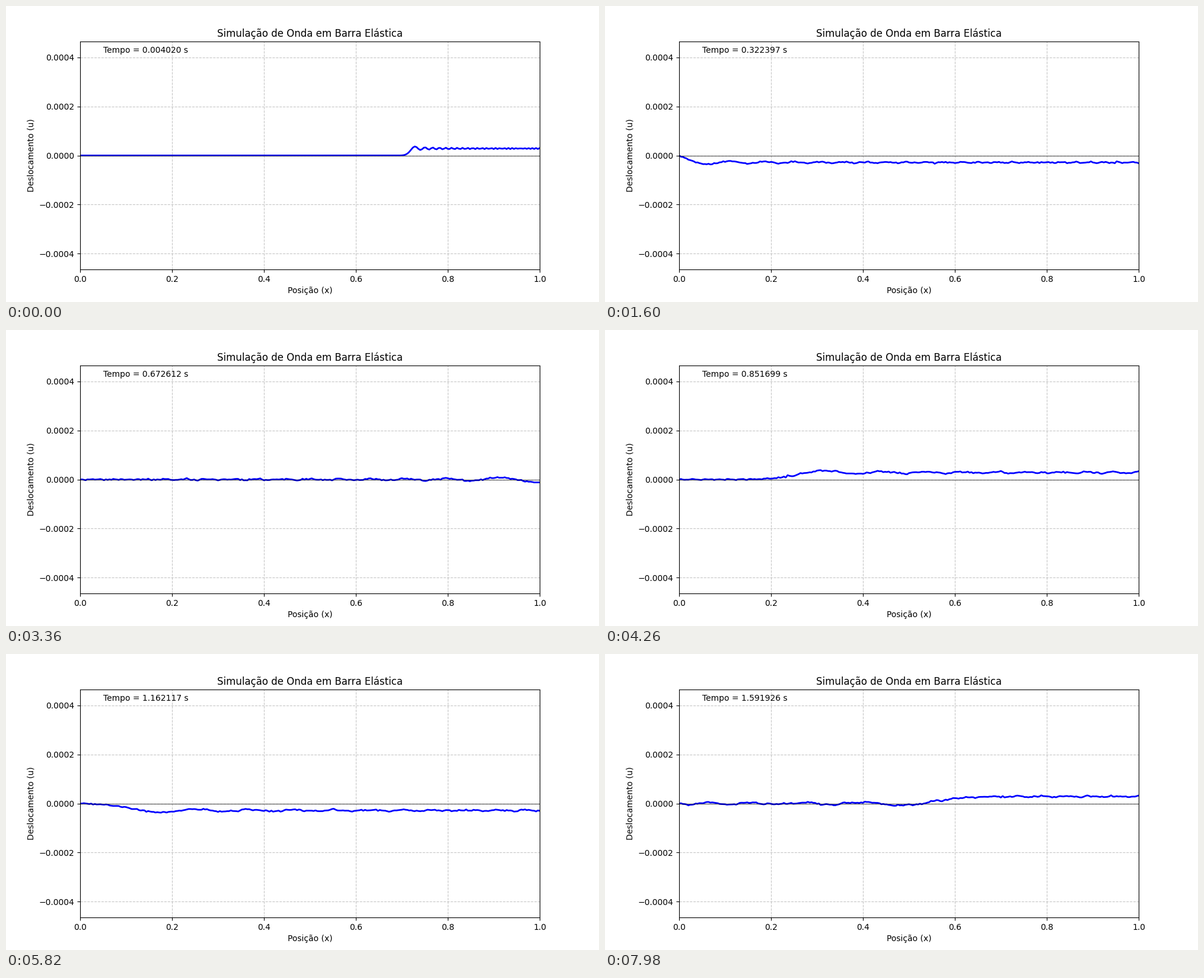
These frames come from a looping animation (1000 by 500 pixels, 8 s). A matplotlib script:

```python
import matplotlib.pyplot as plt
import numpy as np
from matplotlib.animation import FuncAnimation

FRAMES = 400
INTERVAL = 20          # ms
STEPS_PER_FRAME = 99
FIRST_STEP = 100

LENGTH = 1.0
CELLS = 250
SPEED = 71.3565        # wave speed
DT = 4.019914e-5
STEP_HEIGHT = 2.84e-5  # displacement behind the front
Y_LIMIT = 4.647e-4

x = np.linspace(0, LENGTH, CELLS + 1)
courant = SPEED * DT * CELLS / LENGTH


def simulate():
    """Leapfrog solution of a bar fixed at x=0 and struck at its free end."""
    c2 = courant ** 2
    prev = np.zeros_like(x)
    cur = np.zeros_like(x)
    cur[-1] = 2 * STEP_HEIGHT * courant
    states = []
    last_step = FIRST_STEP + STEPS_PER_FRAME * (FRAMES - 1)
    for step in range(1, last_step + 1):
        if step >= FIRST_STEP and (step - FIRST_STEP) % STEPS_PER_FRAME == 0:
            states.append(cur.copy())
        new = 2 * cur - prev
        new[1:-1] += c2 * (cur[2:] - 2 * cur[1:-1] + cur[:-2])
        new[-1] += 2 * c2 * (cur[-2] - cur[-1])
        new[0] = 0
        prev, cur = cur, new
    return states


states = simulate()

fig, ax = plt.subplots(figsize=(10, 5), dpi=100)
line, = ax.plot(x, states[0], color="blue", lw=2)
ax.axhline(0, color="black", lw=0.5)
ax.set_xlim(0, LENGTH)
ax.set_ylim(-Y_LIMIT, Y_LIMIT)
ax.set_title("Simulação de Onda em Barra Elástica")
ax.set_xlabel("Posição (x)")
ax.set_ylabel("Deslocamento (u)")
ax.grid(True, linestyle="--", alpha=0.7)
clock = ax.text(0.05, 0.95, "", transform=ax.transAxes)


def update(frame):
    line.set_ydata(states[frame])
    time = (FIRST_STEP + STEPS_PER_FRAME * frame) * DT
    clock.set_text(f"Tempo = {time:.6f} s")
    return line, clock


anim = FuncAnimation(fig, update, frames=FRAMES, interval=INTERVAL,
                     repeat=True, repeat_delay=0)
plt.show()
```
